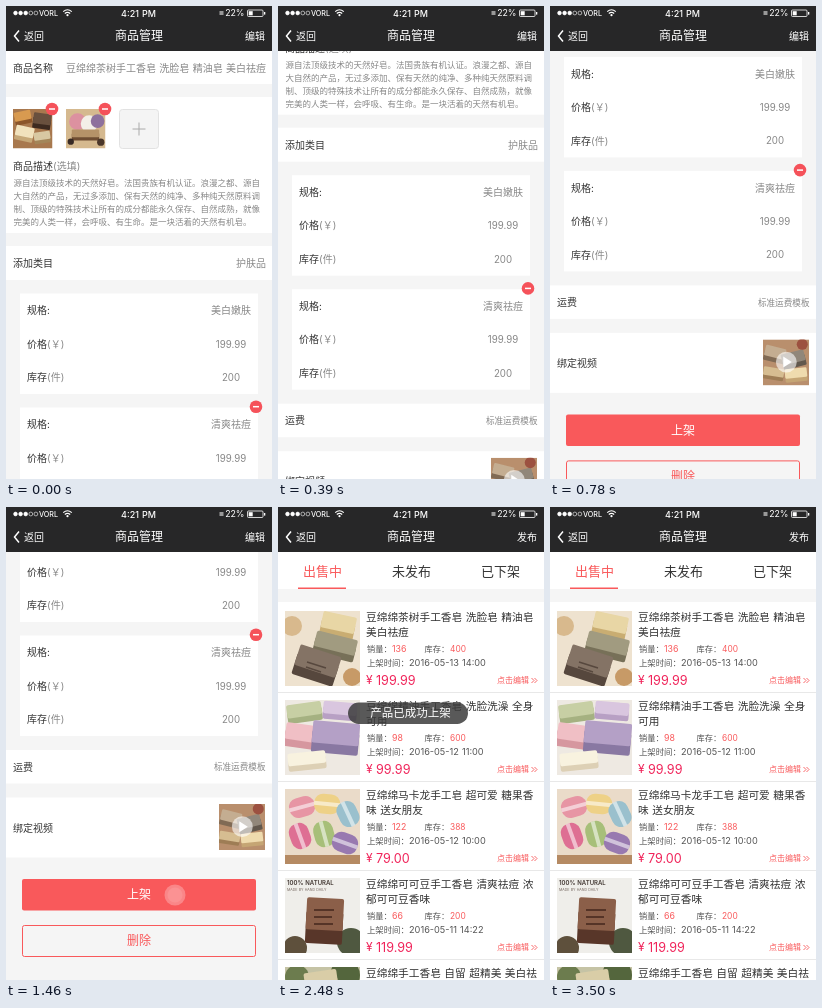
An HTML page for the animation above (3.57 s loop, 266x473 px).

```html
<!DOCTYPE html>
<html lang="zh-CN">
<head>
<meta charset="utf-8">
<style>
  html, body { margin: 0; height: 100%; overflow: hidden; background: #f5f5f5; }
  svg { display: block; }
  text { font-family: Inter, "Noto Sans CJK SC", "Noto Sans CJK", sans-serif; word-spacing: .05em; white-space: pre; }
</style>
</head>
<body>
<svg id="stage" width="266" height="473" viewBox="0 0 266 473"></svg>
<script>
const LOOP = 3570, SCROLL = 273, SCROLL_TIME = 900, STEP = 30;
const INK = '#333', GREY = '#888', RED = '#f9595b', PRICE = '#f0245a', BAR = '#272728';
const BRAND = '豆绵绵';

// Drawing helpers; text is placed by its vertical centre
const rect = (x, y, w, h, fill, extra = '') =>
  `<rect x="${x}" y="${y}" width="${w}" height="${h}" fill="${fill}" ${extra}/>`;
const circle = (x, y, r, fill, extra = '') =>
  `<circle cx="${x}" cy="${y}" r="${r}" fill="${fill}" ${extra}/>`;
const line = (d, color, width = 1) =>
  `<path d="${d}" fill="none" stroke="${color}" stroke-width="${width}"/>`;
const text = (x, y, str, size = 10, fill = INK, anchor = 'start', weight = 400) =>
  `<text x="${x}" y="${y + size * .37}" font-size="${size}" fill="${fill}" text-anchor="${anchor}" font-weight="${weight}">${str}</text>`;
const noted = (str, note) => `${str}<tspan fill="${GREY}">${note}</tspan>`;
const minus = (x, y) => circle(x, y, 6.3, '#f5525a') + line(`M${x - 3} ${y}h6`, '#fff', 1.5);

// Thumbnails are drawn in a 75 x 75 box
const thumb = (x, y, size, bg, art) =>
  `<svg x="${x}" y="${y}" width="${size}" height="${size}" viewBox="0 0 75 75">${rect(0, 0, 75, 75, bg)}${art}</svg>`;
const soap = (x, y, w, h, top, side, angle = 0) =>
  `<g transform="rotate(${angle} ${x + w / 2} ${y + h / 2})">` +
  rect(x, y + h * .3, w, h * .7, side, 'rx="2"') + rect(x, y, w, h * .7, top, 'rx="2"') + '</g>';
const macaron = (x, y, color, angle) =>
  `<g transform="translate(${x} ${y}) rotate(${angle})">` + rect(-13, -10, 26, 20, color, 'rx="9"') +
  rect(-13, -2, 26, 4, '#fff', 'opacity=".55"') + '</g>';

const art = {
  bars: soap(36, 3, 34, 24, '#e8d6a5', '#c9ad72', 12) + soap(29, 24, 42, 23, '#a19b80', '#777058', 14) +
    soap(10, 39, 43, 31, '#847365', '#56473d', 18) + line('M22 51l19 6M21 56l15 5', '#57483e', 1.5) +
    circle(7, 15, 10, '#d8b98d') + circle(67, 66, 9, '#c79a67'),
  wood: soap(3, 4, 32, 25, '#d89a50', '#8b552a', -12) + soap(38, 8, 34, 30, '#69503e', '#3d2a20', 8) +
    soap(4, 33, 35, 28, '#f1e2bd', '#c6a878', 12) + soap(40, 43, 31, 22, '#d8c8a2', '#a38558', -8),
  balls: circle(22, 24, 16, '#dc91a0') + circle(44, 28, 16, '#f3efe7') + circle(60, 23, 13, '#8e719d') +
    soap(11, 39, 52, 21, '#b59268', '#6f4d32') + circle(9, 62, 6, '#382a25') + circle(66, 63, 7, '#4b372a'),
  pastel: soap(2, 3, 35, 19, '#c7cfa4', '#a5b181', -8) + soap(38, 2, 34, 18, '#d9c6df', '#b8a0c4', 5) +
    soap(0, 24, 31, 24, '#f0bfc5', '#d6979f', 8) + soap(27, 22, 47, 32, '#b4a0c6', '#8978a2', 5) +
    soap(3, 52, 38, 18, '#f8f2df', '#ddd0b5', -6),
  macarons: macaron(17, 18, '#e795a4', -15) + macaron(42, 15, '#eed187', 5) + macaron(63, 25, '#9ac0cd', 65) +
    macaron(15, 47, '#de6f93', 70) + macaron(39, 45, '#a7bf79', 75) + macaron(60, 54, '#9879b0', 20) +
    rect(0, 66, 75, 9, '#b58a63'),
  natural: circle(66, 64, 14, '#4f5840') + circle(10, 70, 12, '#5e503c') + soap(21, 20, 37, 46, '#8b5f49', '#583629', 3) +
    line('M29 32h20M29 39h18M29 46h19', '#553427', 2) +
    text(2, 5, '100% NATURAL', 6, '#443a35', 'start', 600) + text(2, 12, 'MADE BY HAND DAILY', 3.6, '#776a62'),
  herbs: circle(12, 10, 12, '#6c7c4e') + circle(60, 8, 15, '#54663d') + soap(20, 4, 33, 26, '#d9cda7', '#ad9e74', -8),
  video: soap(2, 12, 34, 25, '#c4ad91', '#806a54', 14) + soap(31, 20, 38, 26, '#91877a', '#62584d', -14) +
    soap(36, 47, 36, 22, '#efdbae', '#c5a574', -6) + soap(0, 46, 34, 20, '#d6bd91', '#9e7d55', 9) +
    circle(64, 8, 9, '#9c5140') + circle(38, 37, 17, '#fff', 'opacity=".6"') +
    '<path d="M33 28l14 9-14 9z" fill="#fff"/>'
};

function header(action) {
  let s = rect(0, 0, 266, 45, BAR);
  for (let i = 0; i < 5; i++)
    s += circle(9.5 + i * 5.1, 7, 1.9, i < 3 ? '#fff' : 'none', 'stroke="#fff" stroke-width=".6"');
  return s + text(33, 7.2, 'VORL', 7.2, '#fff', 'start', 500) +
    line('M57.2 5.6q4.3-3.8 8.6 0M58.8 7.5q2.7-2.3 5.4 0', '#fff', 1.1) + circle(61.5, 9.2, 1.1, '#fff') +
    text(132.5, 7.2, '4:21 PM', 9, '#fff', 'middle', 500) +
    rect(213.5, 5, 4, 4, '#999') + text(238.5, 7.2, '22%', 8.8, '#fff', 'end') +
    rect(241.5, 4, 15.5, 6.5, 'none', 'rx="1" stroke="#fff" stroke-width=".8"') +
    rect(242.7, 5.2, 4, 4.1, '#fff') + rect(258, 6, 1.3, 2.6, '#fff') +
    line('M13 24.5l-4.5 5.5 4.5 5.5', '#fff', 1.5) + text(18, 30, '返回', 10, '#fff') +
    text(133, 30, '商品管理', 12, '#fff', 'middle', 500) + text(259, 30, action, 10, '#fff', 'end', 500);
}

function specCard(y, kind) {
  const rows = [['规格:', kind, 10], [noted('价格', '(￥)'), '199.99', 9.7], [noted('库存', '(件)'), '200', 9.7]];
  return rect(14, y, 238, 100.5, '#fff') + rows.map(([label, value, size], i) =>
    text(21, y + 17 + i * 33.5, label) + text(225, y + 17 + i * 33.5, value, size, GREY, 'middle')).join('');
}

function form() {
  const about = [
    '源自法顶级技术的天然好皂。法国贵族有机认证。浪漫之都、源自',
    '大自然的产品，无过多添加、保有天然的纯净、多种纯天然原料调',
    '制、顶级的特殊技术让所有的成分都能永久保存、自然成熟，就像',
    '完美的人类一样，会呼吸、有生命。是一块活着的天然有机皂。'];
  return rect(0, 45, 266, 33, '#fff') + text(7, 62, '商品名称') +
    text(260, 62, BRAND + '茶树手工香皂 洗脸皂 精油皂 美白祛痘', 10, GREY, 'end') +
    rect(0, 91, 266, 136, '#fff') +
    thumb(7, 103, 39.5, '#a8784e', art.wood) + thumb(60, 103, 39.5, '#d5b98f', art.balls) +
    minus(46, 103) + minus(99, 103) +
    rect(113.5, 103.5, 39, 39, '#f4f4f4', 'rx="3" stroke="#e2e2e2"') + line('M126.5 123h13M133 116.5v13', '#aaa') +
    text(7, 160.5, noted('商品描述', '(选填)')) +
    about.map((row, i) => text(7.5, 177 + i * 13, row, 8.5, GREY)).join('') +
    rect(0, 240, 266, 34, '#fff') + text(7, 257.5, '添加类目') + text(260, 257.5, '护肤品', 10, GREY, 'end') +
    specCard(287.5, '美白嫩肤') + specCard(401.5, '清爽祛痘') + minus(250, 400.7) +
    rect(0, 516, 266, 33.5, '#fff') + text(7, 533, '运费') + text(259.5, 533, '标准运费模板', 8.6, GREY, 'end') +
    rect(0, 563.5, 266, 60, '#fff') + text(7, 594, '绑定视频') + thumb(213, 570, 46, '#b98f6d', art.video) +
    rect(16, 645, 234, 31.5, RED, 'rx="2"') + text(133, 661, '上架', 12, '#fff', 'middle') +
    rect(16.5, 691.5, 233, 31, '#f5f5f5', `rx="2" stroke="${RED}"`) + text(133, 707, '删除', 12, RED, 'middle');
}

function product(i, [bg, picture, title, rest, sold, stock, time, price]) {
  const y = 104 + i * 89;
  return thumb(7, y, 75, bg, art[picture]) + line(`M0 ${y + 81.5}h266`, '#e8e8e8') +
    text(88, y + 5.7, BRAND + title, 10.7) + text(88, y + 21.5, rest, 10.7) +
    text(89, y + 37.5, '销量：', 8.2, '#555') + text(114, y + 37.5, sold, 8.8, RED) +
    text(146.5, y + 37.5, '库存：', 8.2, '#555') + text(172, y + 37.5, stock, 8.4, RED) +
    text(89, y + 52, '上架时间：', 8.4, '#555') + text(131, y + 52, time, 9.2, '#555') +
    text(88, y + 69, '¥', 12, PRICE) + text(98, y + 69, price, 12.6, PRICE) +
    text(219, y + 69.5, '点击编辑', 8, RED) +
    line(`M253.5 ${y + 67}l2.5 2.5-2.5 2.5m3-5l2.5 2.5-2.5 2.5`, RED, .9);
}

function list() {
  const tabs = ['出售中', '未发布', '已下架'];
  const products = [
    ['#eee2cf', 'bars', '茶树手工香皂 洗脸皂 精油皂', '美白祛痘', '136', '400', '2016-05-13 14:00', '199.99'],
    ['#eee9e2', 'pastel', '精油手工香皂 洗脸洗澡 全身', '可用', '98', '600', '2016-05-12 11:00', '99.99'],
    ['#eadbc9', 'macarons', '马卡龙手工皂 超可爱 糖果香', '味 送女朋友', '122', '388', '2016-05-12 10:00', '79.00'],
    ['#efeeea', 'natural', '可可豆手工香皂 清爽祛痘 浓', '郁可可豆香味', '66', '200', '2016-05-11 14:22', '119.99'],
    ['#c5c3a5', 'herbs', '手工香皂 自留 超精美 美白祛', '痘', '80', '300', '2016-05-11 10:00', '99.00']];
  return rect(0, 45, 266, 428, '#fff') + rect(0, 82, 266, 13, '#f5f5f5') +
    tabs.map((name, i) => text(44.5 + i * 89, 64, name, 13, i ? INK : RED, 'middle')).join('') +
    rect(20, 80.5, 48, 1.5, RED) + products.map((p, i) => product(i, p)).join('');
}

const stage = document.getElementById('stage');
stage.innerHTML =
  `<g id="edit">${rect(0, 0, 266, 473, '#f5f5f5')}<g id="form">${form()}</g>` +
  `<g id="tap">${circle(169, 388, 10.5, '#fff', 'opacity=".5"')}${circle(169, 388, 7.5, '#fff', 'opacity=".25"')}</g>` +
  `${header('编辑')}</g>` +
  `<g id="shop">${list()}${header('发布')}` +
  `<g id="toast">${rect(70, 195.5, 120, 21.5, '#3c3c3c', 'rx="10.7" opacity=".88"')}` +
  `${text(132.5, 206, '产品已成功上架', 11.5, '#fff', 'middle')}</g></g>`;

const part = id => document.getElementById(id);
const [edit, formPart, tap, shop, toast] = ['edit', 'form', 'tap', 'shop', 'toast'].map(part);
const ramp = (t, from, to) => Math.min(1, Math.max(0, (t - from) / (to - from)));

function draw(t) {
  const scrolled = ramp(Math.floor(t / STEP) * STEP, 0, SCROLL_TIME) * SCROLL;
  formPart.setAttribute('transform', `translate(0 ${-scrolled})`);
  tap.setAttribute('opacity', t < 1460 ? 0 : .6 * (1 - ramp(t, 1430, 1760)));
  edit.style.display = t < 2030 ? '' : 'none';
  shop.style.display = t < 2030 ? 'none' : '';
  toast.setAttribute('opacity', t < 2260 ? 0 : Math.min(ramp(t, 2230, 2350), 1 - ramp(t, 2450, 3500)));
}

const start = performance.now();
function tick() {
  draw((performance.now() - start) % LOOP);
  requestAnimationFrame(tick);
}
tick();
</script>
</body>
</html>
```
